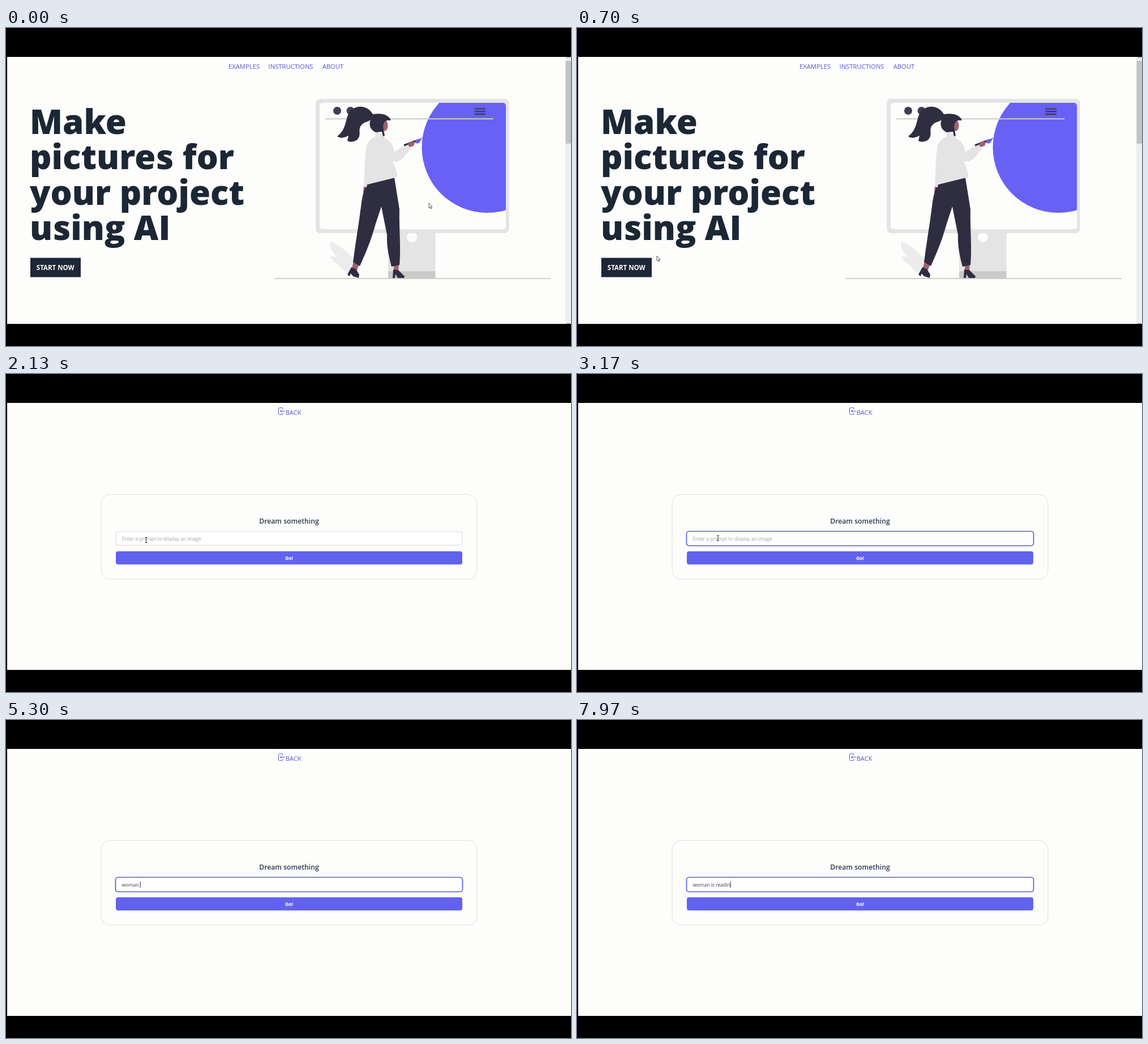
These frames come from a looping animation (998 by 561 pixels, 8000 ms). An HTML page:

```html
<!DOCTYPE html>
<html lang="en">
<head>
<meta charset="utf-8">
<title>AI pictures</title>
<style>
  html, body { margin: 0; height: 100%; overflow: hidden; background: #000; }
  svg { display: block; width: 100%; height: 100%; }
  text { font-family: "Open Sans", "Noto Sans", sans-serif; white-space: pre; }
  .nav { font-size: 11.25px; fill: #5a57d2; }
  .title { font-size: 60px; font-weight: 800; fill: #1c2735; }
  .ink { fill: #2f2e41; }
  .skin { fill: #a0616a; }
  .pale { fill: #e4e4e4; }
</style>
</head>
<body>
<svg viewBox="0 0 998 561">
  <defs>
    <clipPath id="page"><rect x="2" y="51" width="996" height="471"/></clipPath>
    <clipPath id="screen"><rect x="554" y="132" width="329" height="223" rx="5"/></clipPath>
  </defs>
  <rect width="998" height="561"/>
  <g clip-path="url(#page)">
    <rect x="2" y="51" width="996" height="471" fill="#fdfdfc"/>

    <g id="home">
      <g class="nav">
        <text x="393" y="72">EXAMPLES</text>
        <text x="463.5" y="72">INSTRUCTIONS</text>
        <text x="558.7" y="72">ABOUT</text>
      </g>
      <g class="title">
        <text x="42" y="187">Make</text>
        <text x="42" y="249.3">pictures for</text>
        <text x="42" y="311.6">your project</text>
        <text x="42" y="374">using AI</text>
      </g>
      <rect id="start" x="43" y="405.5" width="89" height="34"/>
      <text x="87.3" y="427" text-anchor="middle" font-size="11.5" font-weight="700" fill="#fff">START NOW</text>

      <!-- monitor -->
      <path class="pale" d="M675 360H758.5V430H675Z"/>
      <path fill="#cacaca" d="M675 429H758.5V442H675Z"/>
      <circle cx="717" cy="369" r="9" fill="#fdfdfc"/>
      <rect class="pale" x="547" y="125" width="341.5" height="237" rx="8"/>
      <rect x="554" y="132" width="329" height="223" rx="5" fill="#fdfdfc"/>
      <circle cx="850" cy="210.5" r="115.5" fill="#6960f6" clip-path="url(#screen)"/>
      <path d="M564 160.3H861" stroke="#cbcbcb" stroke-width="2"/>
      <g fill="#3f3d56"><circle cx="585" cy="146" r="7"/><circle cx="608.5" cy="146" r="7"/></g>
      <path d="M827.5 142.6h19.5m-19.500 4.700h19.500m-19.500 4.700h19.500" stroke="#3f3d56" stroke-width="2.4"/>
      <path fill="#ececec" d="M574 376C587 383 600 391 607 401C616 407 621 420 622 437C607 436 594 429 587 418C580 414 575 409 573 403L585 404C578 397 573 390 572 384Z"/>
      <path d="M474 442H962" stroke="#cfcfc6" stroke-width="1.800"/>

      <!-- painter -->
      <path class="skin" d="M614 411L624 416L620 427L611 424ZM685 416H694L693 429H685ZM632 278L638 280L635 290L631 290Z"/>
      <path class="ink" d="M610 422L618 425L624 435L623 441L613 438L609 433L607 438L603 435ZM684 426L693 427L704 438L703 441H692L688 434L687 441H683Z"/>
      <path class="ink" d="M638 276L686 264L695 320C694 350 698 390 695 418L681 421C676 402 672 384 673 365L663 315L653 345C645 375 634 400 625 420L613 413C617 380 623 348 627 315C629 298 632 284 638 276Z"/>
      <path class="pale" d="M654 183L668 188L669 195C679 198 684 207 686 219L708 204L715 212C707 224 699 234 690 236L683 235C688 247 692 256 691 263L638 276L637 281L632 280C634 250 633 222 638 205C642 197 648 194 652 192Z"/>
      <ellipse class="skin" cx="669" cy="172" rx="5.500" ry="10"/>
      <path class="ink" d="M680 163C677 154 665 149 648 152C640 138 624 135 612 143C597 153 605 177 585 191C591 196 599 193 605 190L603 199C608 202 614 201 619 198C630 190 620 179 628 171C633 165 640 166 644 162C640 171 644 180 653 184L664 183L666 191L669 190L667 180C665 171 667 165 673 163Z"/>
      <path d="M703 207L724 199" stroke="#2f2e41" stroke-width="3"/>
      <path class="skin" d="M709 205L717 199L722 202L720 208L713 210Z"/>
      <path fill="#6960f6" d="M722 201Q725 195 730 196L736 193L732 199Q730 205 723 203Z"/>

      <!-- scroll bar -->
      <rect x="988" y="51" width="10" height="471" fill="#eee"/>
      <rect x="988.500" y="58" width="9.500" height="146" fill="#c3c3c3"/>
      <path d="M991 53l2.500 -2.500l2.500 2.500M991 520l2.500 2.500l2.500 -2.500" fill="none" stroke="#555"/>

      <g id="status">
        <rect x="1.500" y="514" width="171" height="12" fill="#f8f8f8" stroke="#e2e2e2" stroke-width=".7"/>
        <text x="4" y="524" font-size="7.200" fill="#555">localhost</text>
      </g>
    </g>

    <g id="dream">
      <path d="M489 62.500V61.500Q489 59.500 487 59.500H483.500Q481.500 59.500 481.500 61.500V69.500Q481.500 71.500 483.500 71.500H487Q489 71.500 489 69.500V68.500M493 65.500H484.500M487 63L484.500 65.500L487 68" fill="none" stroke="#5a57d2"/>
      <text class="nav" x="493.700" y="72">BACK</text>
      <rect x="168" y="212.500" width="664" height="149.500" rx="16" fill="none" stroke="#dededf"/>
      <text x="500" y="263.700" text-anchor="middle" font-size="12.200" font-weight="600" fill="#2c3a4b">Dream something</text>
      <rect id="field"/>
      <text id="prompt" x="204.700" y="294" font-size="8.550"></text>
      <path id="caret" d="M0 285V296" stroke="#333" stroke-width="1"/>
      <rect x="194" y="312.700" width="612" height="23.300" rx="4" fill="#6163ef"/>
      <text x="500" y="328" text-anchor="middle" font-size="8.700" font-weight="700" fill="#fff">Go!</text>
    </g>

    <path id="arrow" d="M0 0V8.500L2 6.800L3.400 10L4.800 9.400L3.500 6.300H6Z" fill="#fff" stroke="#333" stroke-width=".8"/>
    <path id="beam" d="M-2 -4.500H2M0 -4.500V4.500M-2 4.500H2" fill="none" stroke="#333"/>
  </g>
</svg>
<script>
const LOOP = 8000, SWITCH = 1550, FOCUS = 2630, TYPE = 3600;
const $ = id => document.getElementById(id);
const show = (id, on) => $(id).style.display = on ? "" : "none";
const set = (id, attrs) => { for (const k in attrs) $(id).setAttribute(k, attrs[k]); };

// pointer stops: time, x, y
const stops = [
  [0, 747, 309], [700, 141, 402], [860, 110, 412], [1270, 106, 411],
  [1500, 106, 411], [2130, 247.5, 293], [2270, 248, 291], [2630, 249, 289.5]
];
const phrase = "woman is readin";
const keys = [3600, 4030, 4170, 4330, 4500, 4530, 5970, 6170, 6370, 6770, 7030, 7230, 7430, 7630, 7930];
const caretOff = [[3150, 3600], [4730, 5300], [5830, 5970]];

function pointer(t) {
  const i = stops.findIndex(s => s[0] > t);
  if (i < 0) return stops[stops.length - 1].slice(1);
  const [t0, x0, y0] = stops[i - 1], [t1, x1, y1] = stops[i];
  const u = (t - t0) / (t1 - t0), e = u * u * (3 - 2 * u);
  return [x0 + (x1 - x0) * e, y0 + (y1 - y0) * e];
}

function draw(t) {
  const home = t < SWITCH, [x, y] = pointer(t);
  show("home", home);
  show("dream", !home);
  show("status", t >= 870);
  set("start", { fill: home && x < 132 && t > 700 ? "#0d1526" : "#1d2736" });

  const inField = !home && x > 194 && y > 278 && y < 302;
  show("arrow", !inField && t < TYPE);
  show("beam", inField && t < TYPE);
  for (const id of ["arrow", "beam"]) set(id, { transform: `translate(${x} ${y})` });

  const focus = t >= FOCUS, grow = focus ? .5 : 0;
  set("field", {
    x: 194 - grow, y: 278 - grow, width: 612 + 2 * grow, height: 24 + 2 * grow + grow,
    rx: 4 + grow, fill: "#fefefe",
    stroke: focus ? "#5d5bdc" : "#d9d9df", "stroke-width": focus ? 1.7 : 1
  });

  const typed = phrase.slice(0, keys.filter(k => k <= t).length), text = $("prompt");
  text.textContent = typed || "Enter a prompt to display an image";
  text.setAttribute("fill", typed ? "#374151" : "#a2a4ab");
  const end = typed && !home ? text.getComputedTextLength() : 0;
  set("caret", { transform: `translate(${205.2 + end} 0)` });
  show("caret", focus && !caretOff.some(([a, b]) => t >= a && t < b));
}

const begin = performance.now();
function frame() {
  draw((performance.now() - begin) % LOOP);
  requestAnimationFrame(frame);
}
frame();
</script>
</body>
</html>
```
